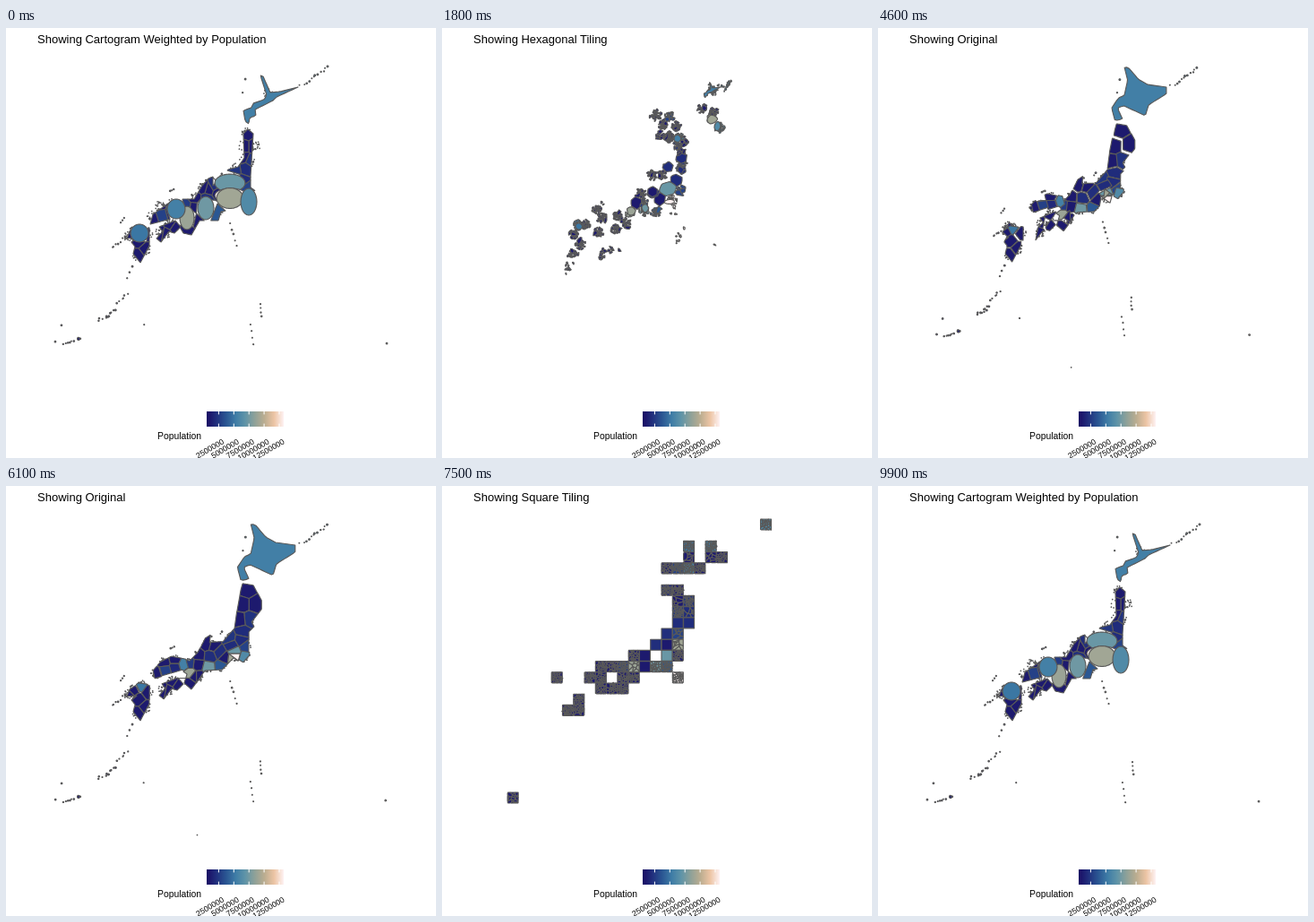
These frames come from a looping animation (480x480 px, 10 s). An HTML page with a canvas:

```html
<!DOCTYPE html>
<html lang="en">
<head>
<meta charset="utf-8">
<title>Population maps</title>
<style>
  html, body { margin: 0; width: 100%; height: 100%; overflow: hidden; background: #fff; }
  #stage { position: relative; width: 480px; height: 480px; }
  canvas, svg, #bar { position: absolute; left: 0; top: 0; }
  #bar { left: 224px; top: 428px; width: 86px; height: 17px; }
  text { font-family: "Liberation Sans", Arial, sans-serif; fill: #000; }
</style>
</head>
<body>
<div id="stage">
  <canvas id="map" width="480" height="480"></canvas>
  <div id="bar"></div>
  <svg id="labels" width="480" height="480">
    <text id="title" x="35" y="17" font-size="13"></text>
    <text x="169" y="459" font-size="10.4">Population</text>
  </svg>
</div>
<script>
const TAU = Math.PI * 2;
const TITLES = ['Cartogram Weighted by Population', 'Hexagonal Tiling', 'Original', 'Square Tiling'];
const PALETTE = ['#1a0c64', '#212f7d', '#2a5592', '#3e7ca6', '#5f94a8', '#8fa198', '#bbad90', '#ecc4a4', '#fef2f3'];

let seed = 41;
const rnd = () => (seed = seed * 16807 % 2147483647) / 2147483647;
const mix = (a, b, k) => a + (b - a) * k;
const pairs = flat => flat.flatMap((v, i) => i % 2 ? [] : [[v, flat[i + 1]]]);
const shift = (poly, dx, dy) => poly.map(([x, y]) => [x + dx, y + dy]);
const ellipse = (x, y, rx, ry = rx, n = 24) =>
  Array.from({ length: n }, (_, i) => [x + rx * Math.cos(i / n * TAU), y + ry * Math.sin(i / n * TAU)]);
const area = p => p.reduce((s, [x, y], i) => {
  const [u, v] = p[(i + 1) % p.length];
  return s + (x * v - u * y) / 2;
}, 0);

// Prefecture centres.
const SITES = {
  Hk: [293,74], Ao: [269,117], Iw: [278,132], Ak: [264,132], Mi: [272,149], Ym: [261,150], Fs: [264,163],
  Ni: [249,170], Tg: [262,172], Ib: [268,180], Gu: [252,178], Sa: [255,185], To: [255,189], Ka: [252,193],
  Ch: [266,192], Yn: [244,192], Nn: [238,186], Ty: [231,179], Is: [224,177], Fi: [215,189], Gi: [228,190],
  Sz: [240,201], Ai: [226,202], Me: [215,213], Sg: [214,199], Ky: [205,198], Os: [205,209], Hy: [198,200],
  Nr: [210,213], Wk: [205,220], Tt: [188,195], Ok: [188,203], Sm: [176,198], Hi: [177,206], Yg: [167,209],
  Kg: [186,218], Ts: [192,222], Eh: [176,227], Ko: [181,228], Fo: [150,224], Sj: [142,228], Ns: [137,233],
  Km: [148,238], Oi: [158,230], Mz: [156,247], Ks: [147,254], On: [81,347]
};

// Millions of people; everywhere else has about 1.2.
const PEOPLE = {
  Hk: 5.5, Mi: 2.3, Fs: 2, Ni: 2.4, Tg: 2, Ib: 3, Gu: 2, Sa: 7.2, To: 13.2, Ka: 9.1, Ch: 6.2, Nn: 2.1,
  Gi: 2.1, Sz: 3.8, Ai: 7.4, Ky: 2.6, Os: 8.9, Hy: 5.6, Ok: 1.9, Hi: 2.9, Fo: 5.1
};
const SOLID = 'Gu Nn Nr Tg Gi Sa Yn Sg'.split(' ');
const FEW = 'Ak Tt Ib Os Ka Ym Fs'.split(' ');
const islandCount = id => id === 'On' || SOLID.includes(id) ? 0 : FEW.includes(id) ? 8 : 27;

function landOf(id) {
  if (id === 'Hk') return 'hokkaido';
  if (id === 'On') return null;
  if ('Kg Ts Eh Ko'.includes(id)) return 'shikoku';
  return 'Fo Sj Ns Km Oi Mz Ks'.includes(id) ? 'kyushu' : 'honshu';
}

const OUTLINES = {
  hokkaido: [273,42, 278,43, 290,57, 301,63, 323,66, 323,74, 302,87, 298,100, 272,88, 265,91, 271,104,
    262,106, 258,91, 266,79, 273,76, 277,58],
  honshu: [262,116, 264,109, 276,111, 285,128, 285,138, 274,152, 277,157, 271,163, 271,190, 264,198,
    254,192, 241,205, 222,206, 213,219, 207,227, 199,220, 202,210, 196,206, 166,215, 164,206, 172,197,
    184,191, 205,195, 214,186, 222,170, 228,166, 227,175, 242,174, 255,159, 258,138],
  shikoku: [171,234, 178,226, 174,221, 192,214, 198,221, 191,228, 185,226, 176,238],
  kyushu: [138,227, 147,221, 160,223, 160,243, 150,262, 142,252, 144,244, 140,239, 146,234, 135,235]
};
const landShape = land => pairs(OUTLINES[land]);

// Outlines and sites after weighting: x, y and, for the swollen ones, two radii.
const WEIGHTED = {
  hokkaido: [284,53, 287,54, 295,72, 306,71, 326,66, 302,77, 298,81, 278,91, 279,98, 272,100, 271,107,
    267,104, 265,92, 274,89, 276,84, 288,80, 291,75],
  honshu: [265,118, 270,113, 276,118, 273,165, 273,178, 280,183, 279,196, 272,209, 250,203, 240,205,
    237,215, 216,215, 207,231, 198,229, 194,222, 196,212, 184,213, 161,219, 164,208, 188,191, 210,191,
    219,176, 226,168, 231,166, 231,176, 248,158, 259,155, 266,145]
};
const SWOLLEN = {
  Ni: [255,157], Gu: [241,167], Yn: [236,183], Nn: [232,177], Fs: [268,155], Ym: [265,146], Sz: [236,206],
  Sa: [250,173,17,10], To: [251,187,18,8], Ka: [250,190,15,11.5], Ch: [271,194,9,15],
  Ai: [223,201,9,13], Os: [202,212,8,13], Hy: [190,202,10,11], Fo: [149,229,10,10]
};
const slide = (land, x) => land === 'shikoku' ? [-3, 1] : land === 'honshu' && x < 245 ? [-4, 1] : [0, 0];

function weightedSite(id) {
  if (SWOLLEN[id]) return SWOLLEN[id];
  const [x, y] = SITES[id], [dx, dy] = slide(landOf(id), x);
  return [x + dx, y + dy];
}
const weightedLand = land =>
  WEIGHTED[land] ? pairs(WEIGHTED[land]) : shift(landShape(land), ...slide(land, 0));

// Tile layouts: row, first column, then ids from left to right.
const HEX_ROWS = [
  [0, 20, 'Ns'], [1, 21, 'Hi'], [2, 20, 'YgKgHkKa'], [3, 21, 'EhAoIwCh'], [4, 18, 'TtOkHy'],
  [7, 17, 'MiAk'], [8, 18, 'YmGu'], [9, 17, 'NnNi'], [10, 14, 'IsTyFs'], [11, 15, 'NrTg'],
  [12, 12, 'FiGiSaIb'], [13, 11, 'SgKyYnTo'], [14, 4, 'SmOiTsOsAiSz'], [15, 1, 'FoSj    WkOn'],
  [16, 0, 'Km  KoMe'], [17, 1, 'Mz'], [18, 0, 'Ks']
];
const hexTile = (c, r) => {
  const x = 147 + 6.62 * c, y = 45 + 11.42 * r;
  return { x, y, poly: Array.from({ length: 6 }, (_, i) =>
    [x + 7.5 * Math.sin(i * TAU / 6), y + 7.5 * Math.cos(i * TAU / 6)]) };
};

const SQUARE_ROWS = [
  [0, 23, 'Ch'], [2, 16, 'Fo  Hk'], [3, 16, 'Tt  AkIw'], [4, 14, 'SmHiHyAo'], [6, 14, 'OkTy'],
  [7, 15, 'YmMi'], [8, 15, 'NiFs'], [9, 15, 'GuTg'], [10, 14, 'NnIb'], [11, 13, 'GiYnKa'],
  [12, 11, 'FiSg  SaIs'], [13, 8, 'YgOiKyOsNrAiSz'], [14, 4, 'Ns    SjEh  KgMe      To'],
  [15, 8, 'KoTsWk'], [16, 6, 'Km'], [17, 5, 'KsMz'], [25, 0, 'On']
];
const squareTile = (c, r) => {
  const x = 79.1 + 12.28 * c, y = 43 + 12.2 * r, h = 6;
  return { x, y, poly: [[x - h, y - h], [x + h, y - h], [x + h, y + h], [x - h, y + h]] };
};

// Tiles by id; one id spans `span` columns.
function layout(rows, span, make) {
  const tiles = {};
  for (const [r, c, ids] of rows)
    ids.match(/../g).forEach((id, i) => { tiles[id] = make(c + i * span, r); });
  return tiles;
}

// Chains of far islands: id, start, end, count.
const CHAINS = [
  ['Hk', 329, 64, 360, 44, 12], ['Hk', 267, 57, 264, 72, 2], ['Ni', 241, 163, 239, 165, 2],
  ['To', 251, 218, 257, 243, 5], ['To', 284, 308, 285, 322, 4], ['To', 273, 331, 276, 353, 4],
  ['To', 425, 352, 425, 352, 1], ['Is', 223, 170, 229, 168, 3], ['Sm', 183, 182, 187, 180, 3],
  ['Ns', 132, 212, 128, 217, 3], ['Ns', 118, 246, 133, 234, 7], ['Ks', 141, 266, 135, 279, 3],
  ['Ks', 135, 296, 125, 307, 6], ['Ks', 122, 314, 113, 323, 6], ['On', 114, 323, 102, 326, 5],
  ['On', 63, 354, 82, 346, 8], ['On', 55, 350, 62, 332, 2], ['On', 154, 331, 155, 331, 1]
];
const chain = ([, x, y, u, v, n]) => Array.from({ length: n }, (_, i) => {
  const k = n > 1 ? i / (n - 1) : 0, wide = n > 4 ? 3 : .5;
  return [mix(x, u, k) + wide * (rnd() - .5), mix(y, v, k) + wide * (rnd() - .5)];
});

function colour(millions) {
  const k = Math.max(0, Math.min(.999, (millions - .57) / 12.63)) * (PALETTE.length - 1);
  const i = Math.floor(k);
  const part = (hex, c) => parseInt(hex.substr(1 + c * 2, 2), 16);
  return `rgb(${[0, 1, 2].map(c => Math.round(mix(part(PALETTE[i], c), part(PALETTE[i + 1], c), k - i)))})`;
}

// Part of the polygon where a*x + b*y <= c.
function cut(poly, a, b, c) {
  const out = [];
  poly.forEach((p, i) => {
    const q = poly[(i + 1) % poly.length];
    const dp = a * p[0] + b * p[1] - c, dq = a * q[0] + b * q[1] - c;
    if (dp <= 0) out.push(p);
    if (dp * dq < 0) {
      const k = dp / (dp - dq);
      out.push([mix(p[0], q[0], k), mix(p[1], q[1], k)]);
    }
  });
  return out;
}

// Weighted Voronoi cell of sites[i] inside an outline; a site is [x, y, weight].
function cell(outline, sites, i, small) {
  const [x, y, w = 0] = sites[i];
  let poly = outline;
  sites.forEach(([u, v, z = 0], j) => {
    if (j !== i) poly = cut(poly, 2 * (u - x), 2 * (v - y), u * u + v * v - z - x * x - y * y + w);
  });
  return poly.length > 2 && Math.abs(area(poly)) > .5 ? poly : ellipse(x, y, small);
}

// Even spacing along the edge, clockwise from the rightmost corner.
function resample(poly, n) {
  if (area(poly) < 0) poly = [...poly].reverse();
  const first = poly.reduce((m, p, i) => p[0] > poly[m][0] ? i : m, 0);
  const ring = [...poly.slice(first), ...poly.slice(0, first + 1)];
  const len = ring.slice(1).map((p, i) => Math.hypot(p[0] - ring[i][0], p[1] - ring[i][1]));
  const step = len.reduce((a, b) => a + b) / n;
  const out = [];
  let i = 0, done = 0;
  for (let k = 0; k < n; k++) {
    while (i < len.length - 1 && done + len[i] < k * step) done += len[i++];
    const f = len[i] ? Math.min(1, (k * step - done) / len[i]) : 0;
    out.push([mix(ring[i][0], ring[i + 1][0], f), mix(ring[i][1], ring[i + 1][1], f)]);
  }
  return out;
}

function split(tile, n) {
  const sites = Array.from({ length: n }, () => {
    const a = rnd() * TAU, d = 6.4 * Math.sqrt(rnd());
    return [tile.x + d * Math.cos(a), tile.y + d * Math.sin(a)];
  });
  return sites.map((_, i) => cell(tile.poly, sites, i, .5));
}

const islands = [], mains = [], blobs = [];

function build() {
  const hexes = layout(HEX_ROWS, 2, hexTile), squares = layout(SQUARE_ROWS, 1, squareTile);
  const ids = Object.keys(SITES);
  for (const id of ids) {
    const land = landOf(id), [ox, oy] = SITES[id], [cx, cy, rx, ry] = weightedSite(id);
    const fill = colour(PEOPLE[id] || 1.2);
    let real = ellipse(ox, oy, 1.5), carto = real;
    if (land) {
      const mates = ids.filter(m => landOf(m) === land), own = mates.indexOf(id);
      real = cell(landShape(land), mates.map(m => SITES[m]), own, 2);
      carto = rx ? ellipse(cx, cy, rx, ry) : cell(weightedLand(land), mates.map(m => {
        const [x, y, a = 0, b = 0] = weightedSite(m);
        return [x, y, a * b * .8];
      }), own, 2);
    }
    const far = CHAINS.filter(c => c[0] === id).flatMap(chain);
    const spots = far.map(p => [p, p]);
    for (let k = islandCount(id); k > 0; k--) {
      const a = rnd() * TAU, d = 2.5 + 3.5 * rnd(), dx = d * Math.cos(a), dy = d * Math.sin(a);
      spots.push([[cx + dx, cy + dy], [ox + dx, oy + dy]]);
    }
    if (id === 'To') spots.push([[276, 353], [213, 391]]);
    const hex = split(hexes[id], spots.length + 1), square = split(squares[id], spots.length + 1);
    const shape = (polys, size) => ({ fill, forms: polys.map(p => resample(p, size)) });
    (rx ? blobs : mains).push(shape([carto, hex[0], real, square[0]], 64));
    spots.forEach(([c, o], k) => {
      const r = k < far.length ? .4 + .6 * rnd() : .3;
      islands.push(shape([ellipse(...c, r, r, 8), hex[k + 1], ellipse(...o, r, r, 8), square[k + 1]], 9));
    });
  }
}

function buildLegend() {
  document.getElementById('bar').style.background = `linear-gradient(90deg, ${PALETTE})`;
  const svg = document.getElementById('labels');
  for (let i = 1; i <= 5; i++) {
    const x = 220.5 + 16.9 * i;
    svg.insertAdjacentHTML('beforeend',
      `<path d="M${x} 428v3.4M${x} 441.6v3.4" stroke="#fff"/>
       <text font-size="8.8" text-anchor="end" transform="translate(${x + 6.5} 463.5) rotate(-30)">${i * 2500000}</text>`);
  }
}

const MOVES = [[800, 2500], [3400, 5000], [5900, 7500], [8400, 9900]];
const ctx = document.getElementById('map').getContext('2d');
const title = document.getElementById('title');
const ease = k => k < .5 ? 4 * k ** 3 : 1 - 4 * (1 - k) ** 3;

function draw(time) {
  let from = 0, k = 0;
  MOVES.forEach(([start, end], i) => {
    if (time >= start) {
      from = i;
      k = Math.min(1, (time - start) / (end - start));
    }
  });
  const to = (from + 1) % 4, e = ease(k);
  title.textContent = 'Showing ' + TITLES[k >= .5 ? to : from];
  ctx.clearRect(0, 0, 480, 480);
  ctx.strokeStyle = '#595959';
  ctx.lineWidth = 1.15;
  ctx.lineJoin = 'round';
  for (const { fill, forms } of [...islands, ...mains, ...blobs]) {
    const a = forms[from], b = forms[to];
    ctx.beginPath();
    a.forEach((p, i) => ctx.lineTo(mix(p[0], b[i][0], e), mix(p[1], b[i][1], e)));
    ctx.closePath();
    ctx.fillStyle = fill;
    ctx.fill();
    ctx.stroke();
  }
}

build();
buildLegend();
const begin = performance.now();
let shown = -1;
function tick() {
  const time = Math.floor((performance.now() - begin) / 100) * 100 % 10000;
  if (time !== shown) draw(shown = time);
  requestAnimationFrame(tick);
}
tick();
</script>
</body>
</html>
```
